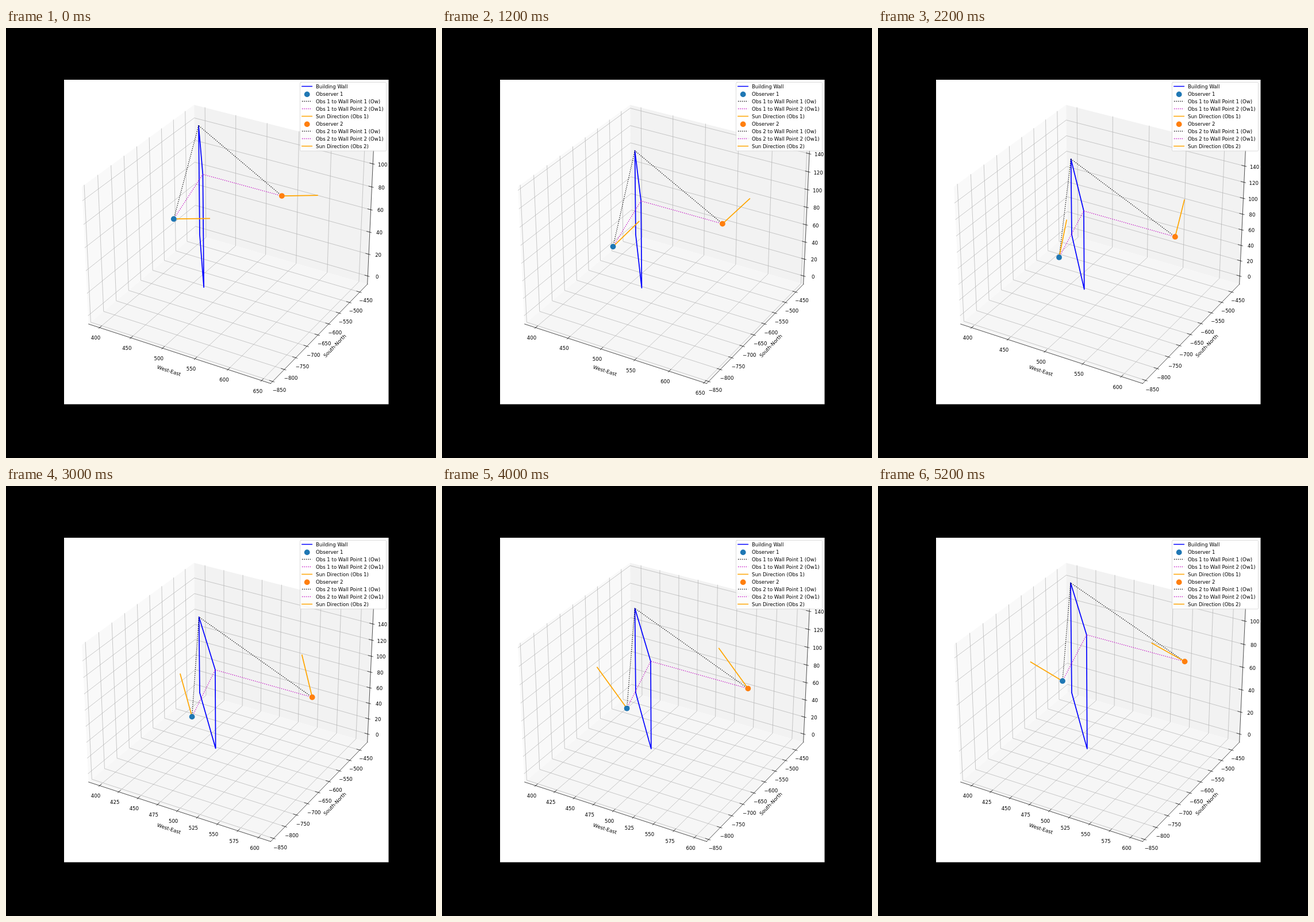
These frames come from a looping animation (748 by 748 pixels, 5.3 s). An HTML page with a canvas:

```html
<!DOCTYPE html>
<html lang="en">
<head>
<meta charset="utf-8">
<title>Sun direction over a day</title>
<style>
  html, body { margin: 0; width: 100%; height: 100%; overflow: hidden; background: #000; }
  canvas { display: block; }
</style>
</head>
<body>
<canvas id="stage" width="748" height="748"></canvas>
<script>
const ctx = document.getElementById('stage').getContext('2d');
const STEP = 100, STEPS = 53;
const PT = 0.857, FONT = 10 * PT;
const RAD = Math.PI / 180;

// Scene, in metres: east, north, up
const TOP = 100, REACH = 50;
const WALL = [[400, -440], [480, -635]];
const OBSERVERS = [
  { pos: [510, -830, TOP], color: '#1f77b4' },
  { pos: [600, -635, TOP], color: '#ff7f0e' }
];
const BLUE = '#0000ff', ORANGE = '#ffa500', PURPLE = '#bf00bf';

// Sun path
const LAT = 29 * RAD, DECL = 23.4 * RAD, NOON = 25.87, TURN = 3.79 * RAD;

function sunAt(n) {
  const h = (n - NOON) * TURN;
  const { sin, cos } = Math;
  return [
    -cos(DECL) * sin(h),
    cos(LAT) * sin(DECL) - sin(LAT) * cos(DECL) * cos(h),
    sin(LAT) * sin(DECL) + cos(LAT) * cos(DECL) * cos(h)
  ];
}

// Camera: elevation 30, azimuth -60, distance 10. Box coordinates run -0.5 to 0.5.
const BOX = [1.19048, 1.19048, 0.89286];
const S3 = Math.sqrt(3), ZOOM = 564 / 0.185, CX = 390.6, CY = 364.4;

function project(p) {
  const [x, y, z] = p.map((v, i) => v * BOX[i]);
  const depth = 10 - (S3 / 4 * x - 0.75 * y + z / 2);
  return [
    CX + ZOOM * (S3 / 2 * x + y / 2) / depth,
    CY - ZOOM * (-x / 4 + S3 / 4 * y + S3 / 2 * z) / depth
  ];
}

function line(points, color, width, dash = []) {
  ctx.beginPath();
  points.forEach(p => ctx.lineTo(p[0], p[1]));
  ctx.strokeStyle = color;
  ctx.lineWidth = width * PT;
  ctx.lineCap = dash.length ? 'butt' : 'square';
  ctx.lineJoin = 'round';
  ctx.setLineDash(dash);
  ctx.stroke();
  ctx.setLineDash([]);
}

const DOTS = [1.5 * PT, 2.475 * PT];
const dotted = (points, color) => line(points, color, 1.5, DOTS);

function dot([x, y], color) {
  ctx.beginPath();
  ctx.arc(x, y, 4.9, 0, 7);
  ctx.fillStyle = color;
  ctx.fill();
}

function text(str, x, y, align = 'left') {
  ctx.font = FONT + 'px "DejaVu Sans", sans-serif';
  ctx.textAlign = align;
  ctx.fillStyle = '#000';
  ctx.fillText(str, x, y);
}

function turnedText(str, [x, y], from, to) {
  const a = project(from), b = project(to);
  ctx.save();
  ctx.translate(x, y);
  ctx.rotate(Math.atan2(b[1] - a[1], b[0] - a[0]));
  text(str, 0, 0.275 * FONT, 'center');
  ctx.restore();
}

function makeAxis(values) {
  const lo = Math.min(...values), hi = Math.max(...values), span = hi - lo;
  const mid = (lo + hi) / 2, size = span * 1.1 * 25 / 24;
  const raw = span * 1.1 / 9;
  const step = [10, 20, 25, 50, 100].find(s => s >= raw);
  const ticks = [];
  for (let v = Math.ceil((mid - size / 2) / step) * step; v <= mid + size / 2; v += step) ticks.push(v);
  return { at: v => (v - mid) / size, ticks };
}

const H = 0.5, IN = 0.2 / 12, OUT = 0.1 / 12, PAD = 0.035, FAR = 0.076;

// For each axis: grid line, tick mark and label place at box position v
const AXES = [
  {
    grid: v => [[v, -H, -H], [v, H, -H], [v, H, H]],
    tick: v => [[v, -H - OUT, -H], [v, -H + IN, -H]],
    label: v => [v, -H - PAD, -H - PAD],
    edge: [[-H, -H, -H], [H, -H, -H]],
    name: 'West-East', namePos: [0, -H - FAR, -H - FAR]
  },
  {
    grid: v => [[H, v, -H], [-H, v, -H], [-H, v, H]],
    tick: v => [[H + OUT, v, -H], [H - IN, v, -H]],
    label: v => [H + PAD, v, -H - PAD],
    edge: [[H, -H, -H], [H, H, -H]],
    name: 'South-North', namePos: [H + FAR, 0, -H - FAR]
  },
  {
    grid: v => [[-H, -H, v], [-H, H, v], [H, H, v]],
    tick: v => [[H + OUT, H, v], [H - IN, H, v]],
    label: v => [H + PAD, H + PAD, v],
    edge: [[H, H, -H], [H, H, H]]
  }
];

const PANES = [
  ['#f9f9f9', [[-H, -H, -H], [-H, H, -H], [-H, H, H], [-H, -H, H]]],
  ['#f2f2f2', [[-H, H, -H], [H, H, -H], [H, H, H], [-H, H, H]]],
  ['#f6f6f6', [[-H, -H, -H], [H, -H, -H], [H, H, -H], [-H, H, -H]]]
];

function drawBox(scales) {
  PANES.forEach(([color, corners]) => {
    ctx.beginPath();
    corners.map(project).forEach(p => ctx.lineTo(p[0], p[1]));
    ctx.closePath();
    ctx.fillStyle = color;
    ctx.fill();
  });
  AXES.forEach((axis, i) => scales[i].ticks.forEach(v =>
    line(axis.grid(scales[i].at(v)).map(project), '#b0b0b0', 0.8)));
  AXES.forEach((axis, i) => {
    line(axis.edge.map(project), '#000', 0.8);
    if (axis.name) turnedText(axis.name, project(axis.namePos), ...axis.edge);
    scales[i].ticks.forEach(v => {
      const at = scales[i].at(v);
      line(axis.tick(at).map(project), '#000', 0.8);
      const [x, y] = project(axis.label(at));
      text(String(v).replace('-', '\u2212'), x, y + 0.76 * FONT, 'center');
    });
  });
}

function drawLegend() {
  ctx.beginPath();
  ctx.roundRect(511.5, 94.5, 150, 119.5, 1.7);
  ctx.fillStyle = 'rgba(255,255,255,0.8)';
  ctx.fill();
  ctx.strokeStyle = 'rgba(204,204,204,0.8)';
  ctx.lineWidth = PT;
  ctx.stroke();

  let y = 101.5;
  const row = (label, draw) => {
    draw([[515, y], [532.2, y]]);
    text(label, 539, y + 3.2);
    y += 13;
  };
  row('Building Wall', p => line(p, BLUE, 2));
  OBSERVERS.forEach(({ color }, i) => {
    const n = i + 1;
    row(`Observer ${n}`, p => dot([523.7, p[0][1] + 0.9], color));
    row(`Obs ${n} to Wall Point 1 (Ow)`, p => dotted(p, '#000'));
    row(`Obs ${n} to Wall Point 2 (Ow1)`, p => dotted(p, PURPLE));
    row(`Sun Direction (Obs ${n})`, p => line(p, ORANGE, 2));
  });
}

function draw(n) {
  const sun = sunAt(n);
  const tips = OBSERVERS.map(o => o.pos.map((v, i) => v + REACH * sun[i]));
  const [low1, low2] = WALL.map(p => [...p, 0]);
  const [top1, top2] = WALL.map(p => [...p, TOP]);
  const all = [low1, low2, top1, top2, ...tips, ...OBSERVERS.map(o => o.pos)];
  const scales = [0, 1, 2].map(i => makeAxis(all.map(p => p[i])));
  const place = p => project(p.map((v, i) => scales[i].at(v)));

  ctx.fillStyle = '#000';
  ctx.fillRect(0, 0, 748, 748);
  ctx.fillStyle = '#fff';
  ctx.fillRect(101, 90, 564.5, 564.5);

  ctx.save();
  ctx.beginPath();
  ctx.rect(101, 90, 564.5, 564.5);
  ctx.clip();
  drawBox(scales);
  line([low1, low2, top2, top1, low1].map(place), BLUE, 2);
  OBSERVERS.forEach(({ pos }, i) => {
    dotted([pos, top1].map(place), '#000');
    dotted([pos, top2].map(place), PURPLE);
    line([pos, tips[i]].map(place), ORANGE, 2);
  });
  OBSERVERS.forEach(o => dot(place(o.pos), o.color));
  drawLegend();
  ctx.restore();
}

let shown = -1;
const start = performance.now();
function tick() {
  const n = Math.floor(Math.max(0, performance.now() - start) / STEP) % STEPS;
  if (n !== shown) draw(shown = n);
  requestAnimationFrame(tick);
}
tick();
</script>
</body>
</html>
```
